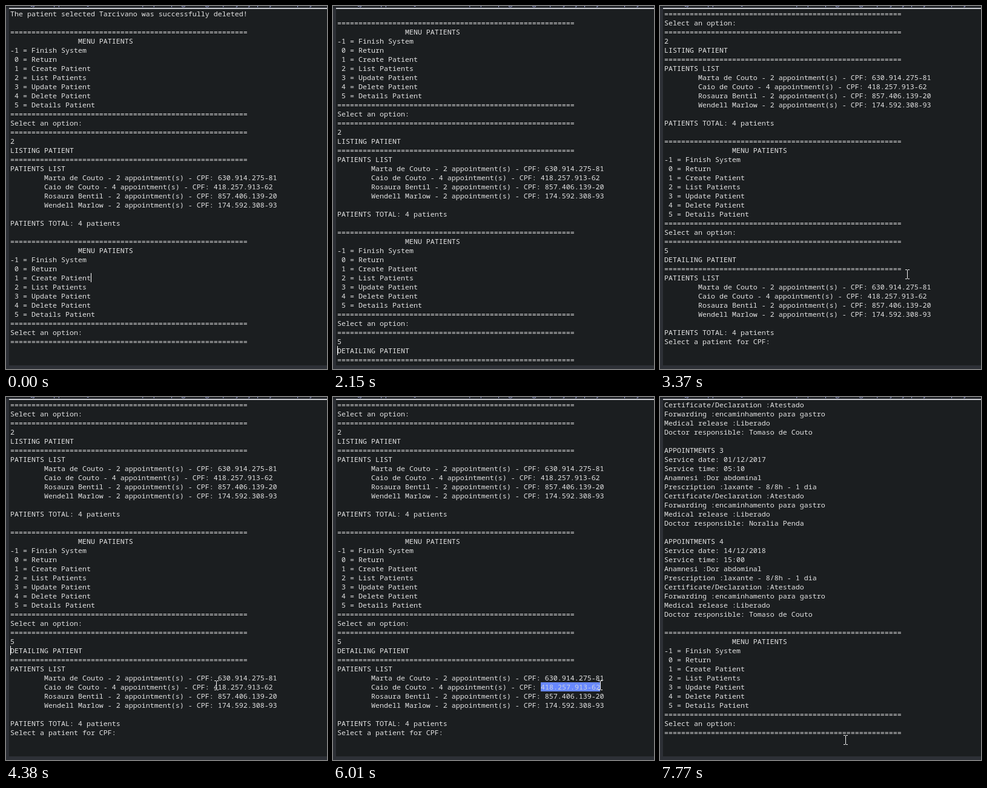
An HTML page that plays this animation: 530 by 598 pixels, repeating every 8 s.

```html
<!DOCTYPE html>
<html lang="en">
<head>
<meta charset="utf-8">
<title>Patient console</title>
<style>
  html, body { margin: 0; width: 530px; height: 598px; overflow: hidden; background: #1b1e20; }
  body { position: relative; }
  body > * { position: absolute; }
  #header { left: 0; top: 0; width: 530px; height: 3px; overflow: hidden; background: #202328; }
  #header span { position: absolute; left: 9px; top: -13px; white-space: pre; color: #aab0e6;
    font: 12px/16px "Open Sans", sans-serif; }
  #edge { left: 5px; top: 3px; width: 525px; height: 2px; background: #c9cbd0; }
  #side { left: 0; top: 3px; width: 5px; height: 595px; background: #2d3036; }
  #foot { left: 0; top: 592px; width: 530px; height: 6px; background: #2d3036; }
  #screen, #selection { margin: 0; white-space: pre; color: #e4e4e4;
    font: 11.6667px/15px "Noto Sans Mono", monospace; }
  #screen { left: 7px; top: 5px; }
  #selection { left: 343px; top: 470px; height: 15px; overflow: hidden; background: #6888ff; color: #cdd3e0; }
  #caret { width: 1px; height: 15px; background: #fff; }
  #mouse { left: 0; top: 0; }
</style>
</head>
<body>
<div id="header"><span>Main [Java Application] C:\Users\user\.p2\pool\plugins\org.eclipse.justj.openjdk.hotspot.jre.full.win32</span></div>
<div id="edge"></div>
<div id="side"></div>
<div id="foot"></div>
<pre id="screen"></pre>
<div id="selection"></div>
<div id="caret"></div>
<svg id="mouse" width="7" height="16" fill="none" stroke="#f2f2f2"><path d="M0 .5h3m1 0h3M3.5 1v14M0 15.5h3m1 0h3"/></svg>
<script>
const LOOP = 8000, CELL = 7, ROW = 15, LEFT = 7, TOP = 5;
const [screenBox, selection, caret, mouse] =
  ['screen', 'selection', 'caret', 'mouse'].map(id => document.getElementById(id));

const rule = '='.repeat(56);
const cpf = '418.257.913-62';
const menu = [rule, ' '.repeat(16) + 'MENU PATIENTS', '-1 = Finish System', ' 0 = Return',
  ' 1 = Create Patient', ' 2 = List Patients', ' 3 = Update Patient', ' 4 = Delete Patient',
  ' 5 = Details Patient', rule, 'Select an option:', rule];
const patients = [['Marta de Couto', 2, '630.914.275-81'], ['Caio de Couto', 4, cpf],
  ['Rosaura Bentil', 2, '857.406.139-20'], ['Wendell Marlow', 2, '174.592.308-93']];
const list = ['PATIENTS LIST',
  ...patients.map(([name, n, id]) => `        ${name} - ${n} appointment(s) - CPF: ${id}`),
  '', 'PATIENTS TOTAL: 4 patients'];
const log = ['The patient selected Tarcivano was successfully deleted!', '', ...menu,
  '2', 'LISTING PATIENT', rule, ...list, '', ...menu,
  '5', 'DETAILING PATIENT', rule, ...list, 'Select a patient for CPF:'];

const outcome = doctor => ['Certificate/Declaration :Atestado', 'Forwarding :encaminhamento para gastro',
  'Medical release :Liberado', 'Doctor responsible: ' + doctor, ''];
const appointment = (n, date, time, doctor) => ['APPOINTMENTS ' + n, 'Service date: ' + date,
  'Service time: ' + time, 'Anamnesi :Dor abdominal', 'Prescription :laxante - 8/8h - 1 dia',
  ...outcome(doctor)];
const details = [...outcome('Tomaso de Couto'),
  ...appointment(3, '01/12/2017', '05:10', 'Noralia Penda'),
  ...appointment(4, '14/12/2018', '15:00', 'Tomaso de Couto'), ...menu];

const prompt = log.slice(11);
const views = [[0, log.slice(0, 37)], [2030, log.slice(0, 38)], [2150, log.slice(1, 40)],
  [2300, prompt], [6884, [...prompt, cpf]], [7770, details]]
  .map(([time, lines]) => [time, lines.join('\n')]);

// time, column, row; a time alone hides the caret
const carets = [[0, 19, 29], [300], [880, 18, 30], [1480], [2030, 1, 37], [2150, 0, 37],
  [2300, 0, 27], [2840], [3383, 0, 27], [3790], [4380, 0, 27], [4840],
  [6593, 0, 37], [6884, 14, 37], [7470]];

// time, x, y, number of steps towards the next point (none = hold)
const path = [[2976, 494, 401, 6], [3790, 340, 475], [3940, 347, 475], [4530, 347, 476],
  [4840, 347, 476, 6], [5720, 441, 476], [6010, 441, 475, 5], [6739, 306, 565]];

const indexAt = (keys, t) => keys.findLastIndex(key => key[0] <= t);

function pointerAt(t) {
  const i = indexAt(path, t);
  if (i < 0) return null;
  const [start, x, y, steps] = path[i];
  if (!steps) return [x, y];
  const [end, nextX, nextY] = path[i + 1];
  const p = Math.floor((t - start) / (end - start) * steps) / steps;
  const eased = p * (2 - p);
  return [x + (nextX - x) * eased, y + (nextY - y) * eased].map(Math.round);
}

function draw(now) {
  const t = now % LOOP;
  const text = views[indexAt(views, t)][1];
  if (screenBox.textContent !== text) screenBox.textContent = text;

  const [, column, row] = carets[indexAt(carets, t)];
  caret.hidden = column === undefined;
  if (!caret.hidden) {
    caret.style.left = LEFT + column * CELL + 'px';
    caret.style.top = TOP + row * ROW + 'px';
  }

  const pointer = pointerAt(t);
  mouse.style.visibility = pointer ? 'visible' : 'hidden';
  if (pointer) mouse.style.transform = `translate(${pointer[0] - 3}px, ${pointer[1] - 8}px)`;

  const selecting = t >= 4840 && t < 6593;
  const dragX = t < 5720 && pointer ? pointer[0] : 441;
  selection.style.width = (selecting ? Math.round((dragX - 343) / CELL) * CELL : 0) + 'px';
  requestAnimationFrame(draw);
}

selection.textContent = cpf;
requestAnimationFrame(draw);
</script>
</body>
</html>
```
